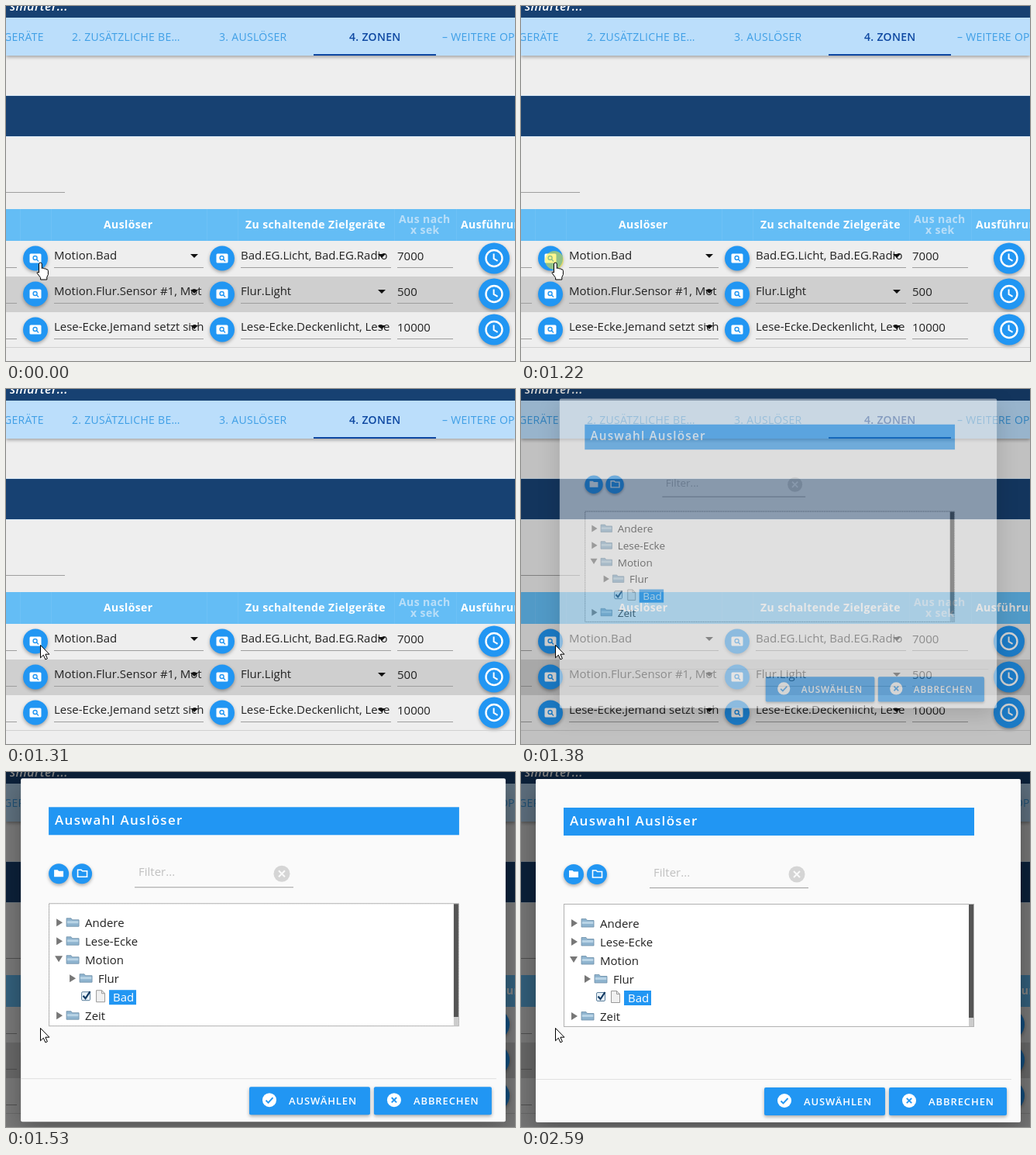
Animation, 657 px wide and 458 px high, one loop 3240 ms. Source, as an HTML page:

```html
<!DOCTYPE html>
<html lang="de">
<head>
<meta charset="utf-8">
<title>Auswahl Auslöser</title>
<style>
  html, body { margin: 0; width: 100%; height: 100%; overflow: hidden; background: #eee; }
  svg { display: block; width: 657px; height: 458px; }
  text { font: 15px "Open Sans", "Noto Sans", sans-serif; fill: #222; white-space: pre; }
  .tab { font-size: 14px; letter-spacing: .3px; fill: #3f9fe6; }
  .active { font-weight: 600; fill: #0d47a1; }
  .head { font-size: 14px; font-weight: 700; letter-spacing: .4px; fill: #fff; }
  .faded { fill: #b9def8; }
  .slogan { font-size: 16px; font-weight: 600; font-style: italic; letter-spacing: .4px; fill: #fff; }
  .title { font-size: 17px; font-weight: 600; letter-spacing: 1.3px; fill: #fff; }
  .button { font-size: 13px; font-weight: 600; letter-spacing: .9px; fill: #fff; }
  .hint { fill: #c0c0c0; }
  .white { fill: #fff; }
  .raised { filter: drop-shadow(0 2px 2px rgba(0, 0, 0, .32)); }
  .sheet { filter: drop-shadow(0 10px 16px rgba(0, 0, 0, .3)); }
</style>
</head>
<body>
<svg id="stage" viewBox="0 0 657 458">
  <clipPath id="triggerClip"><rect x="62" y="302" width="193" height="140"/></clipPath>
  <clipPath id="targetClip"><rect x="303" y="302" width="194" height="140"/></clipPath>
  <clipPath id="treeClip"><rect x="56" y="171" width="528" height="157"/></clipPath>
  <g id="page"></g>
  <rect id="shade" width="657" height="458"/>
  <g id="dialog"></g>
  <circle id="press" cx="43" cy="328" r="12" fill="#ffee20" opacity=".5"/>
  <g stroke="#000" fill="#fff" stroke-linejoin="round">
    <path id="hand" d="M42.5 344V333a1.9 1.9 0 0 1 3.8 0v5.5q1.7-1.4 3 .5 1.6-.9 2.7.8 2-.5 2.4 1.7v5l-1.6 3.3v3.2h-8.2v-2.5l-4.4-5.7q-.8-2.4 2.3-.8z"/>
    <path id="arrow" d="M44.5 330.5v16.3l3.8-3.6 2.6 5.7 2.5-1.1-2.5-5.6h5z"/>
  </g>
</svg>
<script>
const BLUE = '#2196f3', NAVY = '#174172';
const $ = id => document.getElementById(id);

const rect = (x, y, w, h, fill, more = '') =>
  `<rect x="${x}" y="${y}" width="${w}" height="${h}" fill="${fill}" ${more}/>`;
const disc = (x, y, r, fill, more = '') =>
  `<circle cx="${x}" cy="${y}" r="${r}" fill="${fill}" ${more}/>`;
const path = (d, fill, more = '') => `<path d="${d}" fill="${fill}" ${more}/>`;
const line = (d, color, width) =>
  path(d, 'none', `stroke="${color}" stroke-width="${width}"`);
const text = (x, y, content, cls = '', more = '') =>
  `<text x="${x}" y="${y}" class="${cls}" ${more}>${content}</text>`;
const raisedDisc = (x, y, r) => disc(x, y, r, BLUE, 'class="raised"');

const searchButton = (x, y) => raisedDisc(x, y, 16) +
  rect(x - 7.5, y - 6, 15, 12, '#fff', 'rx="1.5"') +
  disc(x - .4, y - .5, 2.5, 'none', `stroke="${BLUE}" stroke-width="1.4"`) +
  line(`M${x + 1.4} ${y + 1.3}l2.6 2.6`, BLUE, 1.4);

const clockButton = (x, y) => raisedDisc(x, y, 20) +
  disc(x, y, 10.5, 'none', 'stroke="#fff" stroke-width="2.4"') +
  line(`M${x - .4} ${y - 6}v6.4l5 3`, '#fff', 2);

const caret = (x, y) => path(`M${x - 5} ${y}h10l-5 5z`, '#111');

function tableRow([trigger, target, delay], i) {
  const y = 303 + 46 * i, base = y + 24, middle = y + 22.5;
  const underlines = [[0, 14], [62, 255], [303, 497], [505, 577]]
    .map(([from, to]) => rect(from, y + 34, to - from, 1, '#9e9e9e')).join('');
  return rect(0, y, 657, 46, i % 2 ? '#cfcfcf' : '#eee') + underlines +
    text(62, base, trigger, '', 'clip-path="url(#triggerClip)"') +
    text(303, base, target, '', 'clip-path="url(#targetClip)"') +
    text(505, base + 1, delay) +
    caret(243, y + 17) + caret(485, y + 17) +
    searchButton(38, middle) + searchButton(279, middle) + clockButton(630, middle);
}

function drawPage() {
  const rows = [
    ['Motion.Bad', 'Bad.EG.Licht, Bad.EG.Radio', '7000'],
    ['Motion.Flur.Sensor #1, Mot', 'Flur.Light', '500'],
    ['Lese-Ecke.Jemand setzt sich', 'Lese-Ecke.Deckenlicht, Lese', '10000'],
  ];
  return rect(0, 0, 657, 458, '#eee') +
    rect(0, 15, 657, 49, '#bbdefb', 'class="raised"') +
    rect(0, 0, 657, 15, NAVY) + text(5, 6, 'smarter...', 'slogan') +
    text(-3, 45, 'GERÄTE', 'tab') +
    text(85, 45, '2. ZUSÄTZLICHE BE…', 'tab') +
    text(275, 45, '3. AUSLÖSER', 'tab') +
    text(443, 45, '4. ZONEN', 'tab active') +
    text(563, 45, '– WEITERE OPTIONEN', 'tab') +
    rect(397, 62, 158, 2, '#0d47a1') +
    rect(0, 116, 657, 52, NAVY) +
    rect(0, 115, 657, 1, '#d5e6f5') + rect(0, 168, 657, 1, '#d5e6f5') +
    rect(0, 240, 76, 1, '#9e9e9e') +
    rect(0, 262, 657, 41, '#64bdf5') +
    [18, 58, 259, 299, 501, 581].map(x => rect(x, 262, 1, 41, '#6dc1f6')).join('') +
    text(126, 287, 'Auslöser', 'head') +
    text(309, 287, 'Zu schaltende Zielgeräte', 'head') +
    text(507, 280, 'Aus nach', 'head faded') + text(522, 294, 'x sek', 'head faded') +
    text(587, 287, 'Ausführung', 'head') +
    rows.map(tableRow).join('') +
    rect(0, 440, 657, 1, '#d0d0d0');
}

const folderIcon = (x, y) =>
  path(`M${x} ${y + 12}v-10.500h6l1.500 2h8.500v8.500z`, '#8fb4cf', 'stroke="#6d8ea8" stroke-width=".8"') +
  rect(x + .8, y + 5, 14.4, 3, '#b9d4e6');
const closedArrow = (x, y) => path(`M${x} ${y - 5}l8 5-8 5z`, '#777');
const openArrow = (x, y) => path(`M${x} ${y - 4}h10l-5 8z`, '#777');

const treeFolder = (label, row, x = 65, open = false) => {
  const y = 195 + 24 * row;
  return (open ? openArrow(x - 2, y - 1) : closedArrow(x, y)) +
    folderIcon(x + 13, y - 7) + text(x + 37, y + 6, label);
};

const checkedLeaf = () =>
  rect(97.5, 284.5, 11, 11, '#e8f1f8', 'stroke="#5c7f9c" rx="1.5"') +
  line('M99.500 289.500l3 3.500 6-9', '#123a63', 2.2) +
  path('M116.500 282.500h7l4 4v11h-11z', '#f0f0f0', 'stroke="#999"') +
  line('M123.500 282.500v4h4', '#999', 1) +
  rect(133, 282, 35, 19, BLUE) + text(138, 297, 'Bad', 'white');

const actionButton = (x, w, label, mark) =>
  rect(x, 407, w, 36, BLUE, 'rx="2" class="raised"') +
  disc(x + 26, 424, 9, '#fff') + line(mark, BLUE, 1.9) +
  text(x + 51, 430, label, 'button');

function drawDialog() {
  const cross = (x, y, r) =>
    `M${x - r} ${y - r}l${2 * r} ${2 * r}M${x + r} ${y - r}l${-2 * r} ${2 * r}`;
  const smallFolder = 'v-9h4.500l1.500 1.500h6v7.500z';
  return rect(19, 9, 626, 443, '#fafafa', 'rx="2" class="sheet"') +
    rect(55, 46, 530, 36, BLUE) + text(63, 69, 'Auswahl Auslöser', 'title') +
    raisedDisc(68, 132, 13) + path('M62 136' + smallFolder, '#fff') +
    raisedDisc(98, 132, 13) + line('M92.500 136' + smallFolder, '#fff', 1.6) +
    rect(166, 149, 205, 1, '#9e9e9e') + text(171, 135, 'Filter...', 'hint') +
    disc(356, 132, 10.5, '#d5d5d5') + line(cross(356, 132, 4), '#fafafa', 2) +
    rect(55.5, 170.5, 529, 158, '#fff', 'stroke="#666" stroke-dasharray="1 1"') +
    `<g clip-path="url(#treeClip)">${
      treeFolder('Andere', 0) + treeFolder('Lese-Ecke', 1) + treeFolder('Motion', 2, 65, true) +
      treeFolder('Flur', 3, 82) + checkedLeaf() + treeFolder('Zeit', 5)}</g>` +
    rect(578, 171, 6, 146, '#555') + rect(578, 317, 6, 11, '#ccc') +
    rect(19, 396, 614, 1, '#e0e0e0') +
    actionButton(314, 156, 'AUSWÄHLEN', 'M335.500 424.500l3 3 6-6.500') +
    actionButton(475, 152, 'ABBRECHEN', cross(501, 424, 3.2));
}

$('page').innerHTML = drawPage();
$('dialog').innerHTML = drawDialog();

const LOOP = 3240, PRESS = 1220, RELEASE = 1310;
const OPENING = [1380, 1450, 1530, 1610];
const show = (id, on) => $(id).setAttribute('visibility', on ? 'visible' : 'hidden');
const easeOut = (t, power) => 1 - (1 - t) ** power;

function render(time) {
  // The dialog opens in four held steps: cubic for the sheet, quadratic for the shade.
  const step = OPENING.filter(start => time >= start).length;
  const progress = step ? Math.min(1, .21 + (step - 1) / 3) : 0;
  const open = easeOut(progress, 3);
  const scale = .8 + .2 * open;
  // The moving sheet rides slightly high until it settles on whole pixels.
  const lift = 36 * (1 - open) + (progress < 1 ? .7 : 0);

  $('shade').setAttribute('opacity', easeOut(progress, 2) / 2);
  $('dialog').setAttribute('opacity', open);
  $('dialog').setAttribute('transform',
    `translate(332 ${230.5 - lift}) scale(${scale}) translate(-332 -230.5)`);
  show('dialog', step > 0);
  show('press', time >= PRESS && time < RELEASE);
  show('hand', time < RELEASE);
  show('arrow', time >= RELEASE);
}

const startTime = performance.now();
function tick() {
  render((performance.now() - startTime) % LOOP);
  requestAnimationFrame(tick);
}
tick();
</script>
</body>
</html>
```
